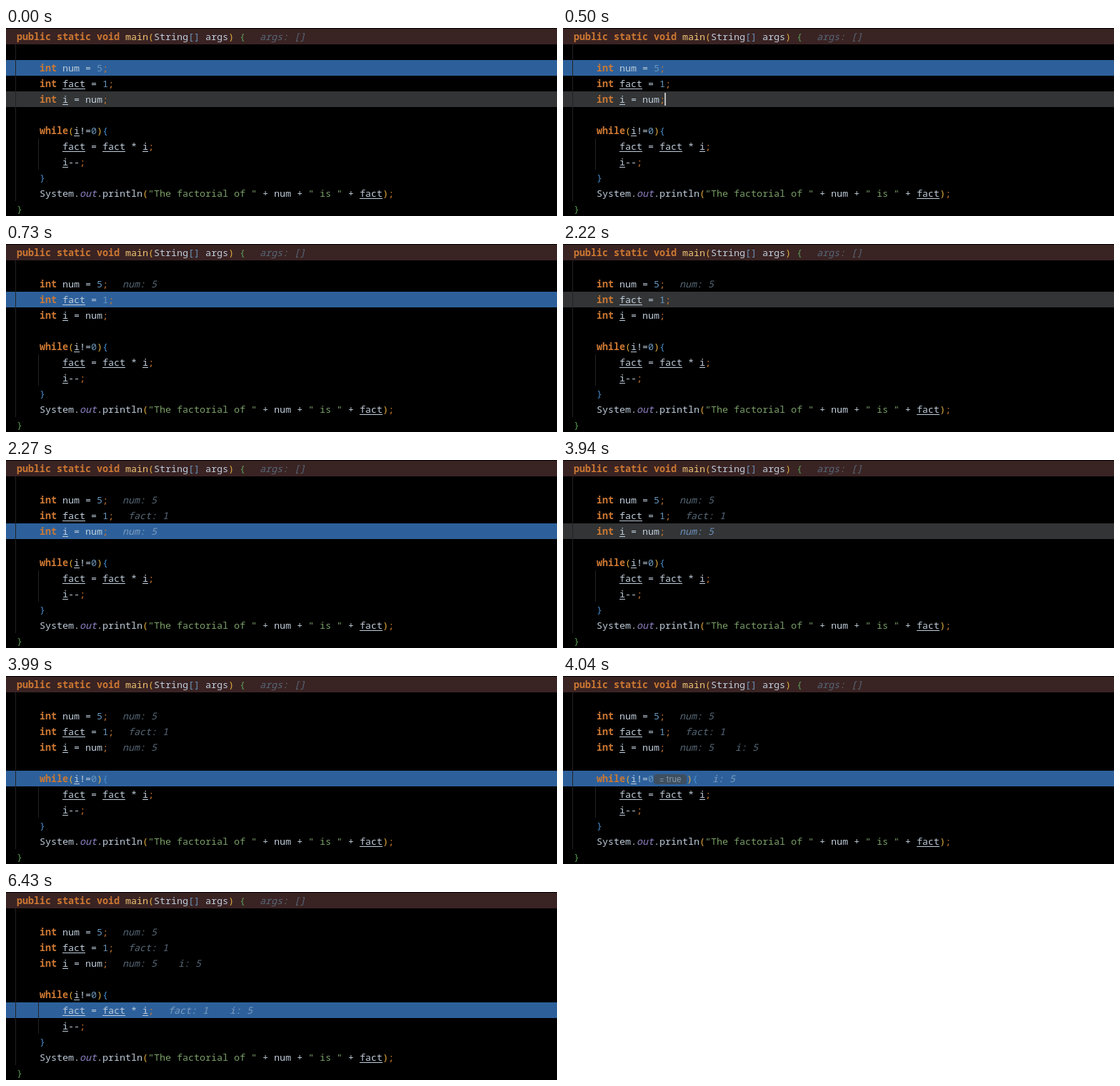
An HTML page that plays this animation: 771x264 px, repeating every 8 s.

```html
<!DOCTYPE html>
<html lang="en">
<head>
<meta charset="utf-8">
<title>Stepping through a factorial</title>
<style>
  html, body { margin: 0; width: 100%; height: 100%; overflow: hidden; background: #000; }
  body { position: relative; }

  .bar, .guide, .caret { position: absolute; }
  .bar { left: 0; width: 771px; height: 22px; }
  .entry { top: 1px; background: #3a2323; }
  .row { top: 89px; background: #323435; animation: row 8s step-end infinite; }
  .exec { top: 45px; background: #2d609b; animation: exec 8s step-end infinite; }
  .guide { width: 1px; background: #232323; }
  .caret { left: 142px; top: 91px; width: 2px; height: 18px; background: #bbb;
           animation: caret 8s step-end infinite; }

  pre { position: absolute; left: 15px; top: 1px; margin: 0; color: #bfcddb;
        font: 13.333px/22px "Noto Sans Mono", "DejaVu Sans Mono", monospace; }
  b { color: #cc7832; font-weight: 700; }
  u { text-decoration: underline 1px; text-underline-offset: 2px; text-decoration-skip-ink: none; }
  i { color: #9083c4; }
  .n { color: #6897bb; }
  .s { color: #7ba068; }
  .k { color: #cc7832; }
  .m { color: #f0c674; }
  .y { color: #e0a93c; }
  .c { color: #4a8fd0; }
  .g { color: #5a9e55; }

  em { margin-left: 20px; color: #566776; }
  em + em { margin-left: 30px; }
  .h1, .h2, .h3, .h4, .h5, .h6 { animation: 8s step-end infinite; }
  .h1 { animation-name: h1; }
  .h2 { animation-name: h2; }
  .h3 { animation-name: h3; }
  .h4 { animation-name: h4; }
  .h5 { animation-name: h5; color: #7b9bbd; }
  .h6 { animation-name: h6; color: #7b9bbd; }
  .inlay { display: inline-block; vertical-align: top; width: 0; height: 14px; margin-top: 5px;
           overflow: hidden; border-radius: 4px; background: #3e4f60; color: #8b9da8;
           font: 11px/14px Inter, "Open Sans", sans-serif; text-align: center;
           animation: inlay 8s step-end infinite; }

  @keyframes exec {
    0% { top: 45px; visibility: visible; }
    9.125% { top: 67px; visibility: visible; }
    27.75% { top: 67px; visibility: hidden; }
    28.375% { top: 89px; visibility: visible; }
    49.25% { top: 89px; visibility: hidden; }
    49.875% { top: 133px; visibility: visible; }
    80.375%, 100% { top: 155px; visibility: visible; }
  }
  @keyframes row {
    0% { top: 89px; visibility: visible; }
    9.125% { top: 89px; visibility: hidden; }
    27.75% { top: 67px; visibility: visible; }
    28.375% { top: 67px; visibility: hidden; }
    49.25% { top: 89px; visibility: visible; }
    49.875%, 100% { top: 89px; visibility: hidden; }
  }
  @keyframes caret {
    0% { visibility: hidden; }
    6.25% { visibility: visible; }
    9.125%, 100% { visibility: hidden; }
  }
  @keyframes h1 { 0% { visibility: hidden; } 9.125%, 100% { visibility: visible; } }
  @keyframes h2 { 0% { visibility: hidden; } 28.375%, 100% { visibility: visible; } }
  @keyframes h3 {
    0% { visibility: hidden; color: #7b9bbd; }
    28.375% { visibility: visible; color: #7b9bbd; }
    49.25% { visibility: visible; color: #6c8fbb; }
    49.875%, 100% { visibility: visible; color: #566776; }
  }
  @keyframes h4 { 0% { visibility: hidden; } 50.5%, 100% { visibility: visible; } }
  @keyframes h5 {
    0% { visibility: hidden; }
    50.5% { visibility: visible; }
    80.375%, 100% { visibility: hidden; }
  }
  @keyframes h6 { 0% { visibility: hidden; } 80.375%, 100% { visibility: visible; } }
  @keyframes inlay { 0% { width: 0; } 50.5% { width: 46px; } 80.375%, 100% { width: 0; } }
</style>
</head>
<body>
<div class="bar entry"></div>
<div class="bar row"></div>
<div class="bar exec"></div>
<div class="guide" style="left:13px;top:23px;height:220px"></div>
<div class="guide" style="left:45px;top:155px;height:44px"></div>
<pre><b>public static void</b> <span class="m">main</span><span class="y">(</span>String<span class="n">[]</span> args<span class="y">)</span> <span class="g">{</span><em>args: []</em>

    <b>int</b> num = <span class="n">5</span><span class="k">;</span><em class="h1">num: 5</em>
    <b>int</b> <u>fact</u> = <span class="n">1</span><span class="k">;</span><em class="h2">fact: 1</em>
    <b>int</b> <u>i</u> = num<span class="k">;</span><em class="h3">num: 5</em><em class="h4">i: 5</em>

    <b>while</b><span class="y">(</span><u>i</u>!=<span class="n">0</span><span class="inlay">=&nbsp;true</span><span class="y">)</span><span class="c">{</span><em class="h5">i: 5</em>
        <u>fact</u> = <u>fact</u> * <u>i</u><span class="k">;</span><em class="h6">fact: 1</em><em class="h6">i: 5</em>
        <u>i</u>--<span class="k">;</span>
    <span class="c">}</span>
    System.<i>out</i>.println<span class="y">(</span><span class="s">"The factorial of "</span> + num + <span class="s">" is "</span> + <u>fact</u><span class="y">)</span><span class="k">;</span>
<span class="g">}</span></pre>
<div class="caret"></div>
</body>
</html>
```
